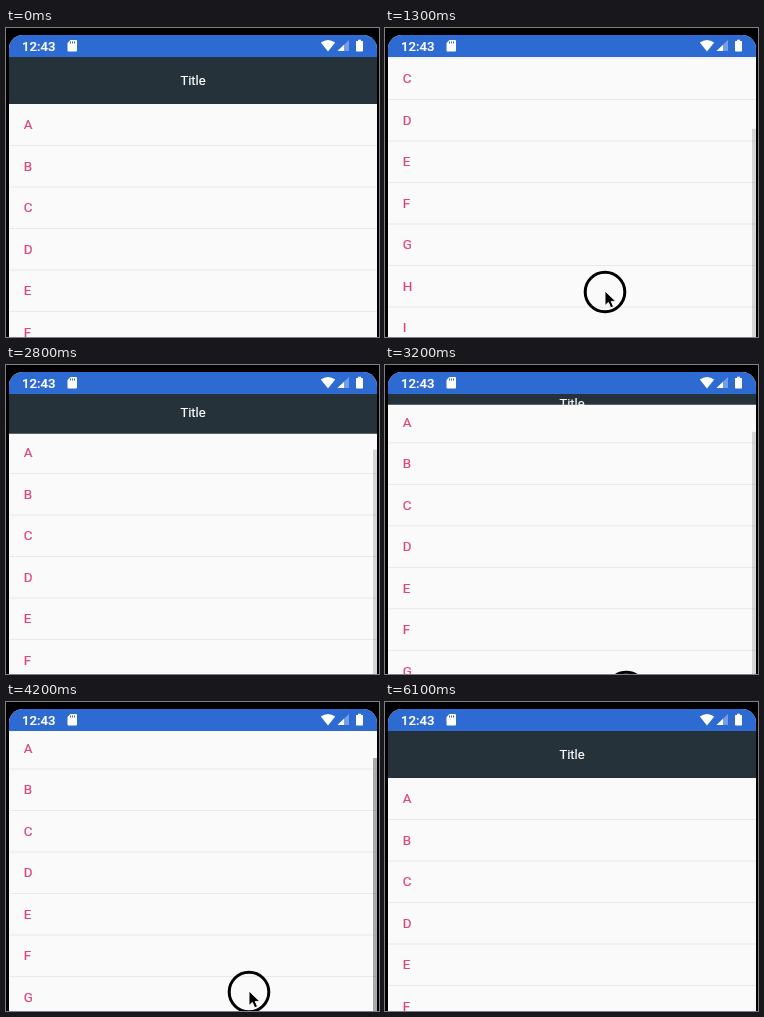
Write an HTML page that moves like this. It is 373 px wide and 309 px high and loops after 6900 ms.

```html
<!DOCTYPE html>
<html lang="en">
<head>
<meta charset="utf-8">
<title>Collapsing header</title>
<style>
  html, body { margin: 0; width: 100%; height: 100%; overflow: hidden; background: #000; }
  svg { display: block; width: 100%; height: 100%; }
  text { font: 13px Roboto, sans-serif; stroke-width: .2; }
  .letter { font-size: 13.4px; fill: #e04674; stroke: #e04674; }
  .rule { fill: #e9e9e9; }
  .light { fill: #fff; }
  .light text, text.light { stroke: #fff; }
  .clock { font-size: 13.2px; font-weight: 500; }
</style>
</head>
<body>
<svg viewBox="0 0 373 309">
  <defs>
    <clipPath id="screen"><rect x="3" y="7" width="368" height="340" rx="14"/></clipPath>
    <clipPath id="headClip"><rect id="headArea" x="3" y="29" width="368" height="47"/></clipPath>
  </defs>
  <rect width="373" height="309" fill="#000"/>
  <g clip-path="url(#screen)">
    <rect x="3" y="7" width="368" height="302" fill="#fafafa"/>
    <g id="list"></g>
    <rect id="bar" x="367" width="4" height="309"/>
    <g clip-path="url(#headClip)">
      <rect x="3" y="29" width="368" height="47" fill="#253239"/>
      <text id="title" class="light" x="187" text-anchor="middle">Title</text>
    </g>
    <rect x="3" y="7" width="368" height="22" fill="#2d6bd3"/>
    <g class="light">
      <text class="clock" x="16" y="22.6">12:43</text>
      <path d="M64.5 12H70q1 0 1 1v9.5q0 1-1 1h-7.5q-1 0-1-1V15z"/>
      <path d="M64.5 13.5v2M66.5 13.5v2M68.5 13.5v2" stroke="#2d6bd3"/>
      <path d="M314.8 14.6q7.2-5 14.4 0L322 23.4z"/>
      <path d="M343 12v11h-11.5z" opacity=".35"/>
      <path d="M338 16.8V23h-6.5z"/>
      <path d="M352 11.7h3v1.2h1.3q.7 0 .7.7v9.2q0 .7-.7.7h-5.6q-.7 0-.7-.7v-9.2q0-.7.7-.7h1.3z"/>
    </g>
  </g>
  <g id="pointer">
    <circle r="19.8" fill="none" stroke="#000" stroke-width="3"/>
    <path d="M0-1V13.5l3.4-3.1 2.3 5.4 2.8-1.2-2.3-5.2h4.6z" fill="#000" stroke="#fff" stroke-width=".9"/>
  </g>
</svg>
<script>
const LOOP = 6900, TICK = 100, TOP = 29, HEAD = 47, ROW = 41.5;
const el = id => document.getElementById(id);

// 0 before a, 1 after b, linear between
const ramp = (t, a, b) => Math.min(1, Math.max(0, (t - a) / (b - a)));
const pulse = (t, a, b, fade = 100) => ramp(t, a - 100, a) - ramp(t, b, b + fade);

const scroll = t => 82 * (ramp(t, 400, 1220) - ramp(t, 1300, 1900))
  + 3.5 * (ramp(t, 2700, 2900) - ramp(t, 4200, 4400));

const collapse = t => HEAD * (ramp(t, 730, 1230) - ramp(t, 2000, 2100)
  + ramp(t, 2700, 3350) - ramp(t, 4700, 4900));

const barAlpha = t => .15 * (pulse(t, 500, 2500) + pulse(t, 2800, 3300))
  + .32 * pulse(t, 4200, 5800, 300);

el('list').innerHTML = [...'ABCDEFGHIJ'].map((c, i) =>
  `<text class="letter" x="17.8" y="${i * ROW + 25.4}">${c}</text>` +
  `<rect class="rule" x="3" y="${(i + 1) * ROW - .5}" width="368" height="1"/>`).join('');

function draw(t) {
  const s = scroll(t), h = collapse(t), edge = TOP + HEAD - h;
  el('list').setAttribute('transform', `translate(0 ${edge - s})`);
  el('headArea').setAttribute('height', HEAD - h);
  el('title').setAttribute('y', Math.max(38, 52 - h * .69) + 4.5);
  el('bar').setAttribute('y', edge + Math.min(s * 9, 25 + s * .57));
  el('bar').setAttribute('opacity', barAlpha(t));

  // The pointer drags the list, drifts up between drags, then leaves below
  const x = 220 + 23 * ramp(t, 2000, 3300);
  const y = 393 - s - h - 52.5 * ramp(t, 2200, 4200) + 90 * ramp(t, 4200, 4400);
  el('pointer').setAttribute('transform', `translate(${x} ${y})`);
}

const start = performance.now();
function frame() {
  const t = (performance.now() - start) % LOOP;
  draw(Math.floor(t / TICK) * TICK);
  requestAnimationFrame(frame);
}
frame();
</script>
</body>
</html>
```
